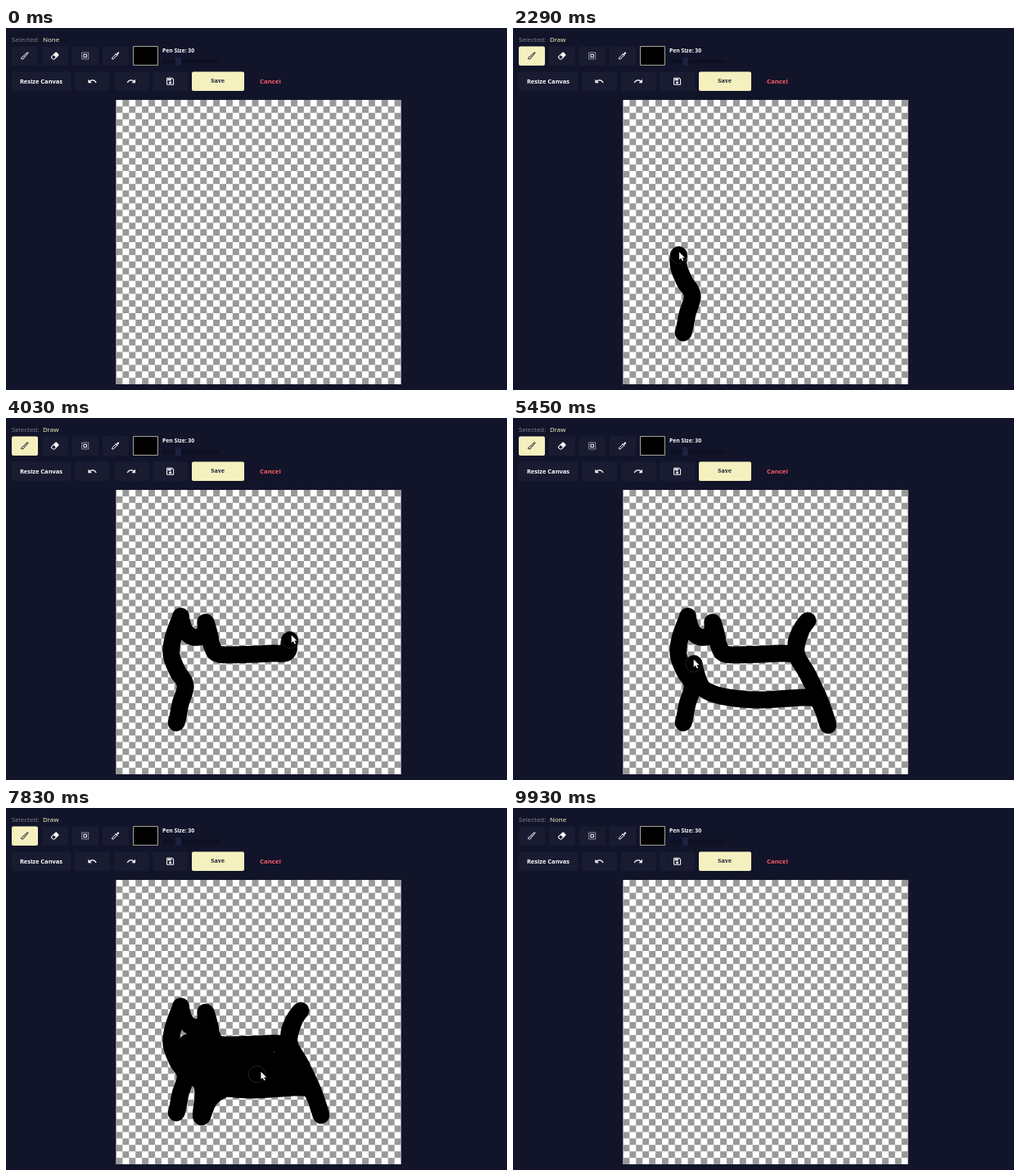
Write an HTML page with a canvas that moves like this. It is 612 px wide and 443 px high and loops after 9960 ms.

```html
<!DOCTYPE html>
<html lang="en">
<head>
<meta charset="utf-8">
<title>Paint editor</title>
<style>
html, body { margin: 0; width: 100%; height: 100%; overflow: hidden; background: #12142a; }
canvas { display: block; }
</style>
</head>
<body>
<canvas id="stage" width="612" height="443"></canvas>
<script>
const W = 612, H = 443, LOOP = 9960;
const BOARD = { x: 134.5, y: 88, size: 348, cells: 44 };
const PEN = 20.9;
const T = { enter: 180, pick: 540, draw: 1540, stop: 8530, fade: 8580 };
const C = {
  bg: '#12142a', button: '#191c31', cream: '#f5f1bf', white: '#fff',
  ink: '#000', grey: '#999', label: '#7d7f8c', red: '#ff5c68'
};
const SANS = '"Noto Sans", "Open Sans", sans-serif';
const SERIF = '"Noto Serif", "DejaVu Serif", serif';

const shape = d => new Path2D(d);
const ICONS = {
  brush: { line: shape('M19.5 3.2L21 4.7 12.5 15 9.5 12zM8.5 13C5.5 13.5 6.5 17 3 18.5 6 21 11 20 11 16') },
  eraser: { fill: shape('M16.2 3.6L21.2 8.5Q22.4 9.9 21.2 11.3L12 20.5Q9.2 22.4 6.3 20.5L2.8 17Q1.6 15.6 2.8 14.2L13.4 3.6Q14.8 2.4 16.2 3.6M4.2 15.6L7.8 19.1Q9.2 20.2 10.6 19.1L14.1 15.6 9.2 10.6z') },
  select: { line: shape('M8.5 8.5h7v7h-7z'), dash: shape('M4 4h16v16H4z') },
  dropper: { line: shape('M4 20v-3l9-9 3 3-9 9zM11.5 6.5l6 6'), fill: shape('M14 8l3.5-4.5Q19 2.5 20.500 3.500 21.500 5 20.500 6.500L16 10z') },
  undo: { fill: shape('M12.500 8c-2.650 0-5.050 1-6.900 2.600L2 7v9h9l-3.600-3.600c1.400-1.200 3.100-1.900 5.100-1.900 3.500 0 6.500 2.300 7.600 5.500l2.400-.8C21.100 11 17.200 8 12.500 8z') },
  save: { fill: shape('M17 3H5Q3 3 3 5v14q0 2 2 2h14q2 0 2-2V7zM19 19H5V5h11.200L19 7.800zM15 15a3 3 0 1 0-6 0 3 3 0 1 0 6 0M6 6h9v4H6z') }
};

function layer() {
  const c = document.createElement('canvas');
  c.width = W;
  c.height = H;
  return c;
}

function box(g, x, y, w, h, color, r = 2) {
  g.fillStyle = color;
  g.beginPath();
  g.roundRect(x, y, w, h, r);
  g.fill();
}

function text(g, str, x, y, font, color, align = 'left') {
  g.font = font;
  g.fillStyle = color;
  g.textAlign = align;
  g.fillText(str, x, y);
}

function icon(g, name, x, y, color, flip = 1) {
  const { line, fill, dash } = ICONS[name];
  g.save();
  g.translate(x, y);
  g.scale(0.5 * flip, 0.5);
  g.translate(-12, -12);
  g.fillStyle = g.strokeStyle = color;
  g.lineWidth = 2;
  if (fill) g.fill(fill, 'evenodd');
  if (line) g.stroke(line);
  if (dash) {
    g.setLineDash([2, 2]);
    g.lineDashOffset = 1;
    g.stroke(dash);
  }
  g.restore();
}

function editor(drawing) {
  const c = layer(), g = c.getContext('2d');
  g.fillStyle = C.bg;
  g.fillRect(0, 0, W, H);

  text(g, 'Selected:', 7, 16.5, '500 7.9px ' + SANS, C.label);
  text(g, drawing ? 'Draw' : 'None', 45, 16.5, '500 7.9px ' + SANS, C.cream);

  ['brush', 'eraser', 'select', 'dropper'].forEach((name, i) => {
    const on = drawing && i === 0, x = 7 + i * 37;
    box(g, x, 22.5, 32, 23.5, on ? C.cream : C.button);
    icon(g, name, x + 15.7, 34, on ? C.bg : C.white);
  });

  box(g, 155, 22, 31, 24, '#a3a294', 1);
  box(g, 156, 23, 29, 22, C.ink, 0);
  text(g, 'Pen Size: 30', 191, 30.3, '700 6.8px ' + SANS, C.white);
  box(g, 191, 38.5, 69, 5, '#0e1021');
  box(g, 207, 36, 7, 10, '#1d2140', 1);

  box(g, 7, 53.5, 72, 23.5, C.button);
  text(g, 'Resize Canvas', 43, 68, '700 7.5px ' + SANS, C.white, 'center');
  ['undo', 'undo', 'save'].forEach((name, i) => {
    const x = 84 + i * 47.6;
    box(g, x, 53.5, 43, 23.5, C.button);
    icon(g, name, x + 21.4, 65.2, C.white, i === 1 ? -1 : 1);
  });
  box(g, 227, 53.5, 64, 23.5, C.cream);
  text(g, 'Save', 258.7, 67.3, '700 7.2px ' + SERIF, C.bg, 'center');
  text(g, 'Cancel', 310, 68, '600 7.8px ' + SANS, C.red);

  const { x, y, size, cells } = BOARD, s = size / cells;
  g.fillStyle = C.white;
  g.fillRect(x, y, size, size);
  g.fillStyle = C.grey;
  for (let r = 0; r < cells; r++)
    for (let q = (r + 1) % 2; q < cells; q += 2) g.fillRect(x + q * s, y + r * s, s, s);
  return c;
}

// Pointer route as [time, x, y]
const approach = [
  [180, 174, 2], [290, 90, 24], [400, 20, 36], [540, 20, 36],
  [850, 150, 145], [1100, 246, 265], [1350, 216, 350], [1500, 204, 366]
];
const outline = [
  [1560, 208, 373], [1760, 213, 350], [1960, 219, 327], [2090, 209, 309],
  [2220, 202, 289], [2350, 204.5, 268], [2500, 213, 245], [2580, 213.5, 245],
  [2740, 218, 259], [2860, 228, 268], [3020, 242, 266], [3090, 244, 257],
  [3140, 244, 250], [3230, 248, 263], [3350, 252, 280], [3530, 260, 289],
  [3740, 290, 289.5], [3900, 325, 288], [3965, 343, 287], [4030, 346.5, 272],
  [4080, 352, 259], [4150, 360, 248], [4240, 352, 260], [4370, 346, 287],
  [4530, 360, 314], [4740, 375, 346], [4830, 385, 376], [4920, 375, 349],
  [4990, 362, 342], [5130, 300, 345], [5250, 258, 341], [5360, 235, 333],
  [5410, 227, 322], [5450, 221, 301], [5530, 222, 287]
];
const neck = [[5570, 225, 308], [5620, 237, 284], [5680, 232, 318], [5720, 247, 300]];
const hatch = Array.from({ length: 20 }, (_, i) =>
  [5750 + i * 60, 246 + i * 5.1 + (i % 2 ? -4 : 5), i % 2 ? 331 : 308]);
const finish = [
  [6960, 349, 318], [7030, 344, 329], [7150, 300, 319], [7280, 255, 320],
  [7400, 241, 335], [7530, 241, 352], [7640, 239, 378], [7730, 254, 351],
  [7830, 306, 326], [8000, 338, 300], [8150, 356, 262], [8310, 340, 304], [8530, 290, 310]
];
const route = [...approach, ...outline, ...neck, ...hatch, ...finish];

const curve = (a, b, c, d, u) =>
  b + 0.5 * u * (c - a + u * (2 * a - 5 * b + 4 * c - d + u * (3 * (b - c) + d - a)));

function pointAt(t) {
  const last = route.length - 1;
  if (t >= route[last][0]) return route[last].slice(1);
  let i = 0;
  while (route[i + 1][0] <= t) i++;
  const p = route[i], n = route[i + 1];
  const a = route[Math.max(0, i - 1)], d = route[Math.min(last, i + 2)];
  const u = Math.max(0, (t - p[0]) / (n[0] - p[0]));
  if (p[1] === n[1] && p[2] === n[2]) return p.slice(1);
  return [1, 2].map(k => curve(a[k], p[k], n[k], d[k], u));
}

const idle = editor(false), active = editor(true);
const ctx = document.getElementById('stage').getContext('2d');
const arrow = shape('M0 0V9.300L2.200 7.300 3.800 10.900 5.300 10.200 3.700 6.800H6.700z');

function drawInk(t) {
  const end = Math.min(t, T.stop);
  ctx.beginPath();
  ctx.moveTo(...pointAt(1560));
  for (let k = 1560; k < end; k += 10) ctx.lineTo(...pointAt(k));
  ctx.lineTo(...pointAt(Math.max(end, 1560)));
  ctx.lineWidth = PEN;
  ctx.lineCap = ctx.lineJoin = 'round';
  ctx.strokeStyle = C.ink;
  ctx.stroke();
}

function drawPointer(t) {
  const [x, y] = pointAt(t > T.draw ? t + 22 : t);
  if (t >= T.pick) {
    const [cx, cy] = pointAt(t);
    ctx.save();
    ctx.beginPath();
    ctx.rect(BOARD.x, BOARD.y, BOARD.size, BOARD.size);
    ctx.clip();
    ctx.beginPath();
    ctx.arc(cx, cy, PEN / 2 - 0.3, 0, 2 * Math.PI);
    ctx.lineWidth = 1;
    ctx.strokeStyle = '#222';
    ctx.stroke();
    ctx.restore();
  }
  ctx.save();
  ctx.translate(x, y);
  ctx.lineWidth = 1;
  ctx.strokeStyle = C.ink;
  ctx.stroke(arrow);
  ctx.fillStyle = C.white;
  ctx.fill(arrow);
  ctx.restore();
}

function render(t) {
  ctx.drawImage(t >= T.pick ? active : idle, 0, 0);
  if (t >= T.draw) drawInk(t);
  if (t >= T.enter) drawPointer(t);
  if (t >= T.fade) {
    ctx.globalAlpha = Math.min(1, (Math.floor((t - T.fade) / 50) + 1) / 28);
    ctx.drawImage(idle, 0, 0);
    ctx.globalAlpha = 1;
  }
}

function tick(now) {
  render(now % LOOP);
  requestAnimationFrame(tick);
}
requestAnimationFrame(tick);
</script>
</body>
</html>
```
